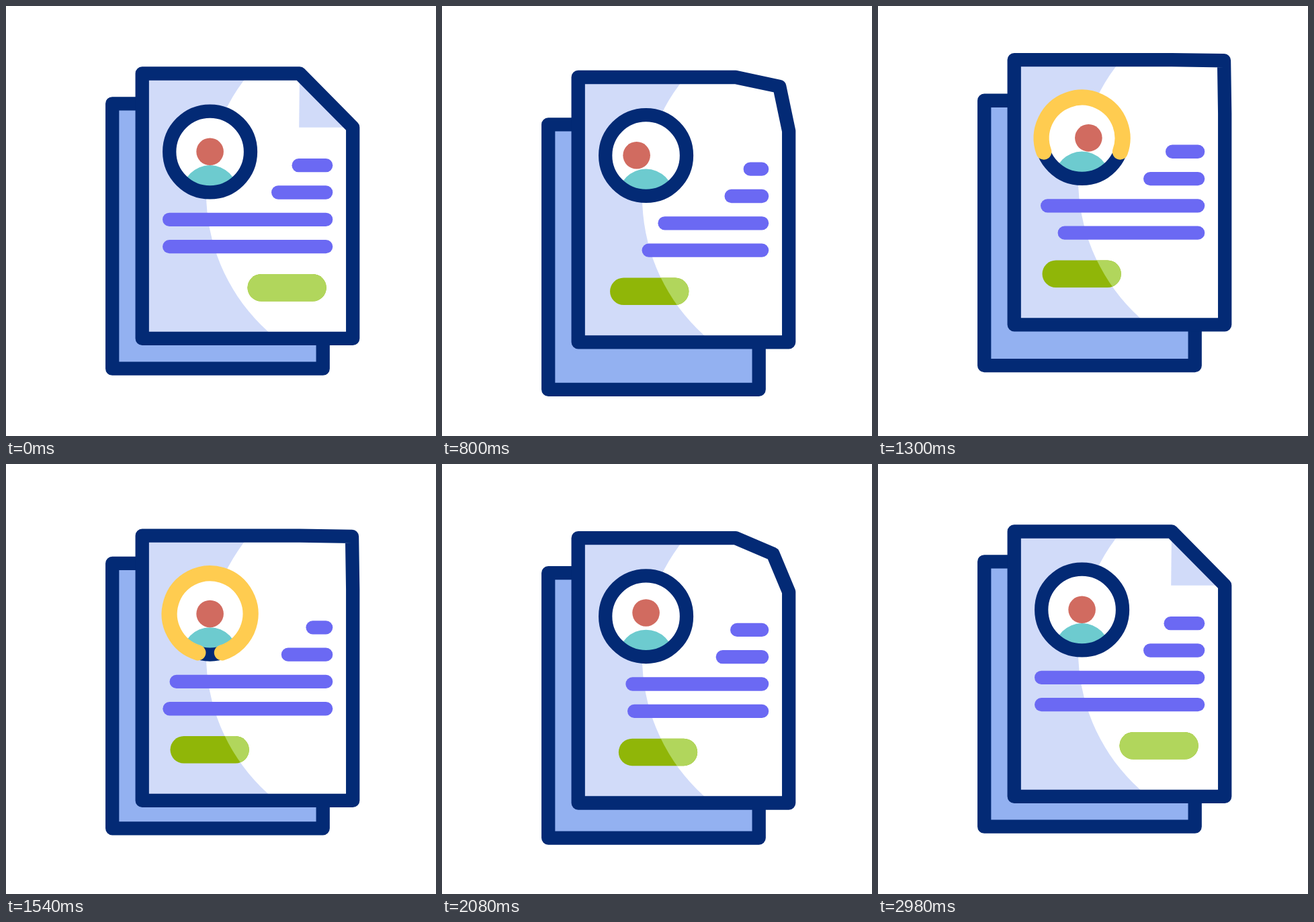
An HTML page with a canvas that plays this animation: 640x640 px, repeating every 3000 ms.

```html
<!DOCTYPE html>
<html lang="en">
<head>
<meta charset="utf-8">
<title>Document</title>
<style>
  html, body { margin: 0; width: 100%; height: 100%; overflow: hidden; background: #fff; }
  canvas { display: block; width: 640px; height: 640px; }
</style>
</head>
<body>
<canvas id="stage" width="640" height="640"></canvas>
<script>
const ctx = document.getElementById('stage').getContext('2d');
const LOOP = 3000, STROKE = 20.3, TAU = Math.PI * 2;
const NAVY = '#032a75', BACK = '#93b1f1', PALE = '#d1dbf9', PURPLE = '#6b69f3',
  RED = '#d16b60', TEAL = '#6dcbcf', LIME = '#b1d65c', OLIVE = '#90b608', YELLOW = '#ffcc50';

// Eased value at time t through time/value pairs
function keys(t, ...k) {
  if (t <= k[0]) return k[1];
  for (let i = 2; i < k.length; i += 2) {
    if (t < k[i]) {
      const p = (t - k[i - 2]) / (k[i] - k[i - 2]);
      return k[i - 1] + (k[i + 1] - k[i - 1]) * p * p * (3 - 2 * p);
    }
  }
  return k[k.length - 1];
}

function polygon(points) {
  const path = new Path2D();
  points.forEach(p => path.lineTo(...p));
  path.closePath();
  return path;
}

function fill(path, color) {
  ctx.fillStyle = color;
  ctx.fill(path);
}

function stroke(path, color, width = STROKE) {
  ctx.strokeStyle = color;
  ctx.lineWidth = width;
  ctx.stroke(path);
}

function circle(x, y, r) {
  const path = new Path2D();
  path.arc(x, y, r, 0, TAU);
  return path;
}

function clipped(path, draw) {
  ctx.save();
  ctx.clip(path);
  draw();
  ctx.restore();
}

function pill(x1, x2, y, height, color) {
  const path = new Path2D(), r = height / 2;
  path.moveTo(x1 + r, y);
  path.lineTo(x2 - r, y);
  stroke(path, color, height);
}

function backPage(t) {
  const dy = keys(t, 440, 0, 880, 34, 1360, -6.2, 1880, 25.3, 2400, 0);
  const top = 145.3 + dy, bottom = 539.7 + dy;
  const page = polygon([[158.2, top], [471.7, top], [471.7, bottom], [158.2, bottom]]);
  fill(page, BACK);
  stroke(page, NAVY);
}

function avatar(t) {
  const x = 303.6, y = 217, face = circle(x, y, 60.4);
  const headX = keys(t, 220, 0, 770, -14.5, 1150, 14.5, 1545, 0);
  const hop = keys(t, 1540, 0, 1830, -17.5, 2220, 0);
  fill(face, '#fff');
  clipped(face, () => {
    fill(circle(x, 278.2, 41.2), TEAL);
    fill(circle(x + headX, y - 0.2 + hop, 20.3), RED);
  });
  stroke(face, NAVY);

  const sweep = Math.PI * keys(t, 1060, 0, 1480, 1, 1800, 0);
  if (sweep > 0) {
    const arc = new Path2D(), up = -Math.PI / 2;
    arc.arc(x, y, 60.4, up - sweep, up + sweep);
    stroke(arc, YELLOW, 23.2);
  }
}

// Each bar shrinks and regrows twice, one after another down the page
function textBars(t) {
  const bars = [
    [425.5, 23.3, 23.3],
    [395, 25.5, 25.5],
    [233, 89, 48],
    [233, 82, 43]
  ];
  bars.forEach(([left, first, second], i) => {
    const s = t - i * 100;
    const inset = keys(s, 220, 0, 620, first, 780, first, 1180, 0,
      1220, 0, 1620, second, 1780, second, 2180, 0);
    pill(left + inset, 486.3, 237.2 + i * 40.3, STROKE, PURPLE);
  });
}

function frontPage(t) {
  const dy = keys(t, 300, 0, 633, 14, 1190, -25, 1770, 22.5, 2340, 0);
  const open = keys(t, 180, 0, 1013, 0.985, 1788, 0.985, 2621, 0);
  const a = [437, 100.5], b = [516.2, 180.7];
  const corner = [436.2 + 80 * open, 180.7 - 80.2 * open];
  const edge = open > 0.5 ? [a, corner, b] : [a, b];
  const page = polygon([[202.7, 100.5], ...edge, [516.2, 494.8], [202.7, 494.8]]);
  const light = circle(576, 278, 278);

  ctx.save();
  ctx.translate(0, dy);
  fill(page, PALE);
  clipped(page, () => fill(light, '#fff'));
  if (open < 0.5) fill(polygon([a, corner, b]), PALE);
  stroke(page, NAVY);

  const x = keys(t, 208, 359.5, 892, 244.5, 1908, 244.5, 2592, 359.5);
  const button = color => pill(x, x + 117.3, 419.2, 40.5, color);
  button(OLIVE);
  clipped(light, () => button(LIME));

  textBars(t);
  avatar(t);
  ctx.restore();
}

function frame(now) {
  const t = now % LOOP;
  ctx.fillStyle = '#fff';
  ctx.fillRect(0, 0, 640, 640);
  ctx.lineJoin = ctx.lineCap = 'round';
  backPage(t);
  frontPage(t);
  requestAnimationFrame(frame);
}

const start = performance.now();
const tick = () => frame(Math.max(0, performance.now() - start));
frame = (draw => () => {
  draw(Math.max(0, performance.now() - start));
})(frame);
requestAnimationFrame(frame);
</script>
</body>
</html>
```
